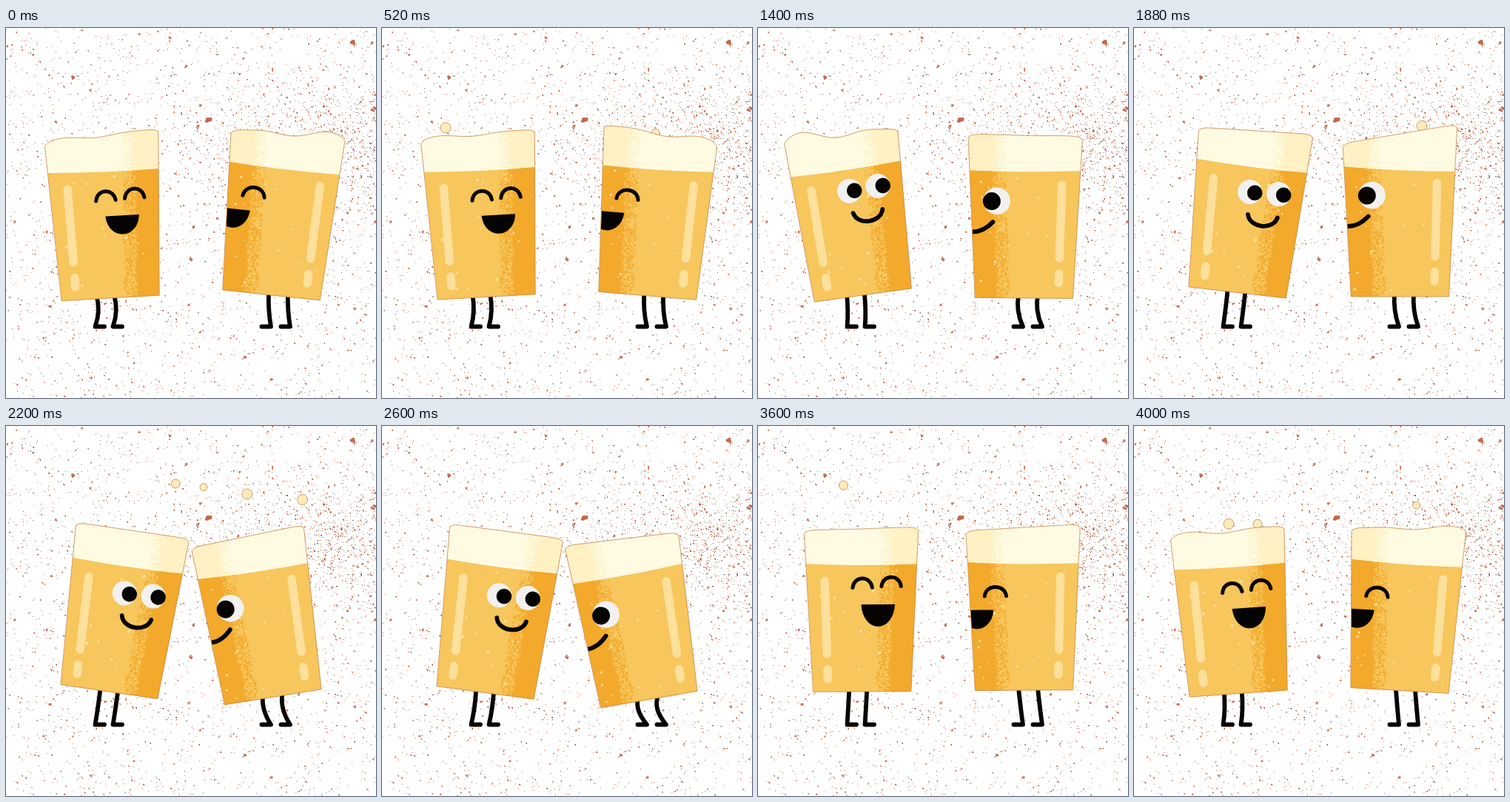
An HTML page with a canvas that plays this animation: 500x500 px, repeating every 4.04 s.

```html
<!DOCTYPE html>
<html lang="en">
<head>
<meta charset="utf-8">
<title>Two glasses</title>
<style>
html, body { margin: 0; width: 100%; height: 100%; overflow: hidden; background: #fff; }
canvas { display: block; width: 100vw; height: 100vh; }
</style>
</head>
<body>
<canvas id="stage" width="500" height="500"></canvas>
<script>
const ctx = document.getElementById('stage').getContext('2d');
const LOOP = 4040, STEP = 40, TAU = Math.PI * 2;
const C = {
  beer: '#f7c65c', amber: '#f2a92c', foam: '#fffbe3', foamShade: '#fff1c4',
  shine: '#fce09b', edge: '#c98548', drop: '#fdebbb', ink: '#060403', eye: '#f2f1ef'
};
const clamp = v => Math.max(0, Math.min(1, v));

function seeded(s) {
  return () => {
    s = (s + 0x6d2b79f5) | 0;
    let r = Math.imul(s ^ (s >>> 15), 1 | s);
    r = (r + Math.imul(r ^ (r >>> 7), 61 | r)) ^ r;
    return ((r ^ (r >>> 14)) >>> 0) / 4294967296;
  };
}

// Key poses: laugh, laugh, lean out, swing in, clink, rest, part, laugh
const beats = [0, 520, 1400, 1880, 2120, 2600, 3200, 4000];
const glasses = [
  {
    side: 1, x: 140.8, hip: 123.5, ankle: 120.5, gap: 24,
    eyes: [[1, -133], [40, -134.5]], eyeR: 16.5, pupil: 10.3, mouthX: 22, smile: 20, shineY: 0,
    lean: [-3.2, -3.1, -7.9, 6.6, 8.4, 7.6, 3.4, -4],
    base: [365, 363.5, 361, 357.5, 359, 360.5, 359, 361.5],
    face: [0, 1, -9, -4, -2, 0, -12, -5],
    slosh: [-5, -3, 3, -4, 0, 0, -2, -2]
  },
  {
    side: -1, x: 359.6, hip: 352, ankle: 358, gap: 26,
    eyes: [[-38, -131]], eyeR: 18.3, pupil: 12, mouthX: -63.5, smile: 27, shineY: -3.5,
    lean: [6, 4.7, 0.5, 0, -9, -9.8, -4, 3.3],
    base: [361, 362, 365, 363, 366, 369.5, 359.5, 357.5],
    face: [0, 2, 0, -6, 3, 8, 0, 5],
    slosh: [-3, 6, 1, -13, -4, 4, -4, -4]
  }
];
glasses.forEach((g, i) => {
  const rnd = seeded(3 + 9 * i);
  g.bubbles = Array.from({ length: 18 }, () => ({
    x: (rnd() - 0.5) * 124, y: rnd() * 160, v: 0.012 + rnd() * 0.025, r: 0.9 + rnd() * rnd() * 2
  }));
});

// Foam drops: launch time and place
const launches = [[105, 101], [506, 369], [620, 160], [1851, 388], [2040, 235], [2060, 262],
  [2090, 330], [3450, 110], [3634, 395], [3971, 127], [3971, 168]];

function ease(track, t) {
  let i = 0;
  while (i < beats.length - 2 && beats[i + 1] <= t) i++;
  const s = clamp((t - beats[i]) / (beats[i + 1] - beats[i]));
  return track[i] + (track[i + 1] - track[i]) * s * s * (3 - 2 * s);
}

function makeSpeckles() {
  const cv = document.createElement('canvas');
  cv.width = cv.height = 500;
  const g = cv.getContext('2d'), rnd = seeded(41);
  const tones = ['#c2623f', '#b2532f', '#cf8663', '#9d8f92', '#c4785a'];
  const spot = () => rnd() < 0.7 ? [rnd() * 500, rnd() * 500]
    : [200 + 300 * Math.sqrt(rnd()), 50 + 110 * (rnd() + rnd())];
  const blot = (x, y, r) => {
    g.beginPath();
    for (let k = 0; k < 5; k++) {
      const bx = x + (rnd() - 0.5) * r * 1.5, by = y + (rnd() - 0.5) * r * 1.5;
      g.moveTo(bx, by);
      g.arc(bx, by, r * (0.4 + rnd() * 0.3), 0, TAU);
    }
    g.fill();
  };
  for (let i = 0; i < 3000; i++) {
    const [x, y] = spot().map(Math.floor);
    g.fillStyle = tones[Math.floor(rnd() * tones.length)];
    g.fillRect(x, y, 1, 1);
    if (rnd() < 0.2) g.fillRect(x + 1, y, 1, 2);
  }
  g.fillStyle = '#c4694c';
  for (let i = 0; i < 300; i++) blot(...spot(), 0.7 + rnd() * rnd() * 1.5);
  [[273, 125, 5], [250, 312, 2.6], [469, 20, 3.6], [90, 67, 2.6], [497, 110, 3]].forEach(b => blot(...b));
  return cv;
}

// Shaded side; grains thin out from the solid edge inwards
function makeShade(seed, y0, y1, solid, slope, grain) {
  const p = new Path2D(), rnd = seeded(seed);
  const edge = y => solid - slope * y;
  p.moveTo(edge(y0), y0);
  p.lineTo(90, y0);
  p.lineTo(90, y1);
  p.lineTo(edge(y1), y1);
  p.closePath();
  for (let i = 0; i < (y1 - y0) * 5; i++) {
    const y = y0 + rnd() * (y1 - y0), x = edge(y) - grain * Math.pow(rnd(), 1.7);
    p.moveTo(x, y);
    p.arc(x, y, 0.5 + rnd() * 0.8, 0, TAU);
  }
  return p;
}

const speckles = makeSpeckles();
const beerShade = makeShade(7, -185, 2, 38, 0.04, 19);
const foamShade = makeShade(9, -245, -165, 44, 0, 16);

function line(width, color, draw) {
  ctx.beginPath();
  draw();
  ctx.lineWidth = width;
  ctx.strokeStyle = color;
  ctx.stroke();
}

function disc(x, y, rx, ry, color) {
  ctx.beginPath();
  ctx.ellipse(x, y, rx, ry, 0, 0, TAU);
  ctx.fillStyle = color;
  ctx.fill();
}

// Foam tilts with the slosh and ripples on the outer side when leaning out
function bodyPath(side, lean, slosh) {
  const p = new Path2D(), ripple = Math.max(0, -side * lean) * 0.9;
  p.moveTo(-66, 0);
  p.lineTo(66, 0);
  for (let x = 77; x >= -77; x -= 3.5) {
    const out = -side * x;
    const wave = ripple * Math.cos(TAU * (out - 50) / 95) * (out + 77) / 131;
    p.lineTo(x, -220 + slosh * x / 77 - wave + 4 * Math.pow(x / 77, 20));
  }
  p.closePath();
  return p;
}

function drawLegs(g, base, lean) {
  const hip = g.hip + lean / 2, bend = g.side * Math.max(0, base - 359) * 0.6;
  for (const dx of [0, g.gap]) {
    const foot = g.ankle + dx;
    line(5.8, C.ink, () => {
      ctx.moveTo(hip + dx, base - 5);
      ctx.quadraticCurveTo((hip + dx + foot) / 2 + bend * 2, 382, foot, 403.5);
      ctx.lineTo(foot + g.side * 12.5, 403.5);
    });
  }
}

function drawEyes(g, dy, open) {
  for (const [x, ey] of g.eyes) {
    const y = ey + dy;
    if (open < 0.3) {
      const h = g.eyeR * 0.8;
      line(5, C.ink, () => {
        ctx.moveTo(x - h, y + 1);
        ctx.bezierCurveTo(x - h + 2, y - 15.5, x + h - 2, y - 15.5, x + h, y + 1);
      });
    } else {
      disc(x, y, g.eyeR, g.eyeR * open, C.eye);
      disc(x + g.side * 6.8, y + 0.5, g.pupil, g.pupil * open, C.ink);
    }
  }
}

function drawMouth(g, dy, laughing) {
  if (laughing) {
    const x = g.mouthX, y = -110 + dy * 0.8, d = (24 + Math.max(0, -dy) * 0.5) * 1.33;
    ctx.beginPath();
    ctx.moveTo(x - 22, y);
    ctx.lineTo(x + 22, y);
    ctx.bezierCurveTo(x + 19, y + d, x - 19, y + d, x - 22, y);
    ctx.fillStyle = C.ink;
    ctx.fill();
    ctx.lineWidth = 1.5;
    ctx.strokeStyle = C.ink;
    ctx.stroke();
  } else {
    // The turned face hides the far half of its wider smile
    const w = g.smile, x = g.side > 0 ? g.mouthX : -70, y = -102.5 + dy;
    const c = g.side > 0 ? 16 : 10;
    line(5.8, C.ink, () => {
      ctx.moveTo(x - w, y);
      ctx.bezierCurveTo(x - c, y + 18, x + c, y + 18, x + w, y);
    });
  }
}

function drawBeer(g, t, slosh) {
  const tip = 0.3 * slosh;
  ctx.save();
  ctx.beginPath();
  ctx.moveTo(-90, 2);
  ctx.lineTo(-90, -173 + tip);
  ctx.bezierCurveTo(-30, -170 + tip / 3, 30, -170 - tip / 3, 90, -173 - tip);
  ctx.lineTo(90, 2);
  ctx.clip();
  ctx.fillStyle = C.beer;
  ctx.fillRect(-90, -200, 180, 204);
  fillShade(g.side, beerShade, C.amber);
  for (const b of g.bubbles) {
    const up = (b.y + b.v * t) % 160;
    disc(b.x + Math.sin(up / 9 + b.y), -6 - up, b.r, b.r, C.shine);
  }
  ctx.restore();
}

function fillShade(side, path, color) {
  ctx.save();
  ctx.scale(side, 1);
  ctx.fillStyle = color;
  ctx.fill(path);
  ctx.restore();
}

function drawShine(g) {
  for (const [top, bottom] of [[-150, -51], [-30, -17.5]]) {
    const at = y => -g.side * (46 - y * 0.026);
    line(11.5, C.shine, () => {
      ctx.moveTo(at(top), top + g.shineY);
      ctx.lineTo(at(bottom), bottom + g.shineY);
    });
  }
}

function drawGlass(g, t) {
  const open = clamp(Math.min((t - 880) / 120, (3600 - t) / 120));
  const bob = 4 * (1 - open) * Math.sin(Math.PI * t / 500) ** 2;
  const lean = ease(g.lean, t), slosh = ease(g.slosh, t), dy = ease(g.face, t);
  const base = ease(g.base, t) - bob;
  drawLegs(g, base, lean);

  ctx.save();
  ctx.translate(g.x - 0.15 * lean, base);
  ctx.rotate(lean * Math.PI / 180);
  const body = bodyPath(g.side, lean, slosh);
  ctx.save();
  ctx.clip(body);
  ctx.fillStyle = C.foam;
  ctx.fillRect(-90, -260, 180, 262);
  fillShade(g.side, foamShade, C.foamShade);
  drawBeer(g, t, slosh);
  drawShine(g);
  drawEyes(g, dy, open);
  drawMouth(g, dy, t < 920 || t >= 2840);
  ctx.restore();
  ctx.lineWidth = 0.8;
  ctx.strokeStyle = C.edge;
  ctx.stroke(body);
  ctx.restore();
}

function drawDrops(t) {
  launches.forEach(([start, x], i) => {
    const s = (t - start) / 440;
    if (s < 0 || s > 1) return;
    const px = x + (i % 2 ? 16 : -16) * s, py = 152 - 320 * s * (1 - s), r = 7 - i % 3;
    disc(px, py, r, r, C.drop);
    line(0.8, C.edge, () => ctx.arc(px, py, r, 0, TAU));
  });
}

function render(t) {
  ctx.fillStyle = '#fff';
  ctx.fillRect(0, 0, 500, 500);
  ctx.drawImage(speckles, 0, 0);
  ctx.lineCap = ctx.lineJoin = 'round';
  drawDrops(t);
  glasses.forEach(g => drawGlass(g, t));
}

const began = performance.now();
function tick() {
  const t = (performance.now() - began) % LOOP;
  render(Math.floor(t / STEP) * STEP);
  requestAnimationFrame(tick);
}
tick();
</script>
</body>
</html>
```
